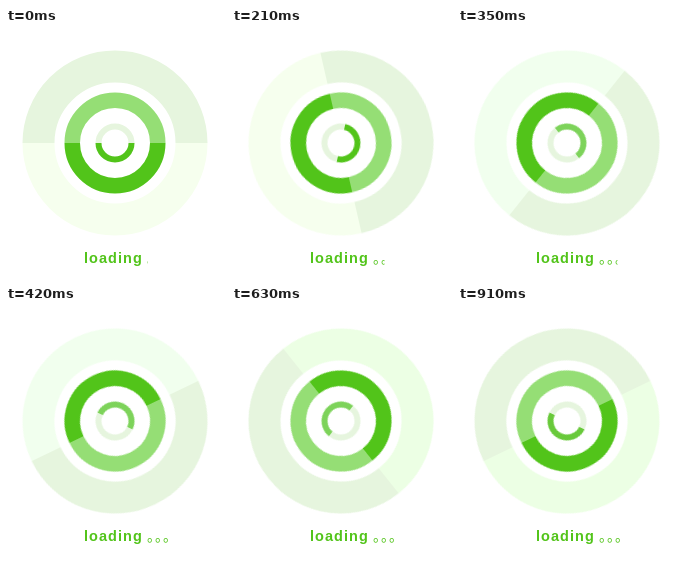
These frames come from a looping animation (220x250 px, 980 ms). An HTML page:

```html
<!DOCTYPE html>
<html lang="en">
<head>
<meta charset="utf-8">
<title>loading</title>
<style>
  html, body { margin: 0; width: 100%; height: 100%; overflow: hidden; background: #fff; }
  svg { display: block; width: 220px; height: 250px; }
  text { font: bold 14.5px "Liberation Sans", Arial, sans-serif; letter-spacing: 1.05px; fill: #52c41a; }
  .dots { font: 14px "Noto Sans CJK SC", "Noto Sans CJK", sans-serif; letter-spacing: 1px; }
</style>
</head>
<body>
<svg viewBox="0 0 220 250">
  <g id="rings" transform="translate(109 115)" fill="none"></g>
  <text x="78" y="235">loading</text>
  <text class="dots" x="141" y="235" lang="zh">。。。</text>
  <rect id="cover" x="142" y="224" width="78" height="20" fill="#fff"/>
</svg>
<script>
const LOOP = 980, STEPS = 14;
const timing = { duration: LOOP, iterations: Infinity, easing: `steps(${STEPS}, end)` };
const rings = document.getElementById('rings');

function half(parent, r, width, color, sweep) {
  const path = document.createElementNS('http://www.w3.org/2000/svg', 'path');
  path.setAttribute('d', `M${-r} 0A${r} ${r} 0 0 ${sweep} ${r} 0`);
  path.setAttribute('stroke', color);
  path.setAttribute('stroke-width', width);
  parent.append(path);
  return path;
}

// Two half rings, turning once per loop; dir 1 is clockwise.
function ring(outer, inner, top, bottom, dir) {
  const g = document.createElementNS('http://www.w3.org/2000/svg', 'g');
  const r = (outer + inner) / 2, width = outer - inner;
  half(g, r, width, top, 1);
  const lower = half(g, r, width, bottom, 0);
  rings.append(g);
  g.animate({ transform: ['rotate(0deg)', `rotate(${360 * dir}deg)`] }, timing);
  return lower;
}

const pale = ring(92.5, 60.5, '#e6f5de', '#f6ffee', 1);
ring(50.5, 35, '#95de75', '#52c41a', 1);
const arc = ring(19.5, 13.5, '#e6f5de', '#52c41a', -1);

// Tints held from the given step onward.
function tint(el, table) {
  const frames = table.map(([step, stroke]) => ({ offset: step / STEPS, stroke, easing: 'steps(1, end)' }));
  el.animate(frames, { duration: LOOP, iterations: Infinity });
}
tint(pale, [[0, '#f6ffee'], [4, '#f1ffee'], [8, '#ecffe4'], [14, '#f6ffee']]);
tint(arc, [[0, '#52c41a'], [4, '#6fcd45'], [5, '#7dd35a'], [10, '#74cf4c'], [13, '#68c93a'], [14, '#52c41a']]);

document.getElementById('cover').animate(
  { transform: ['translateX(0px)', 'translateX(49px)'] }, timing);
</script>
</body>
</html>
```
